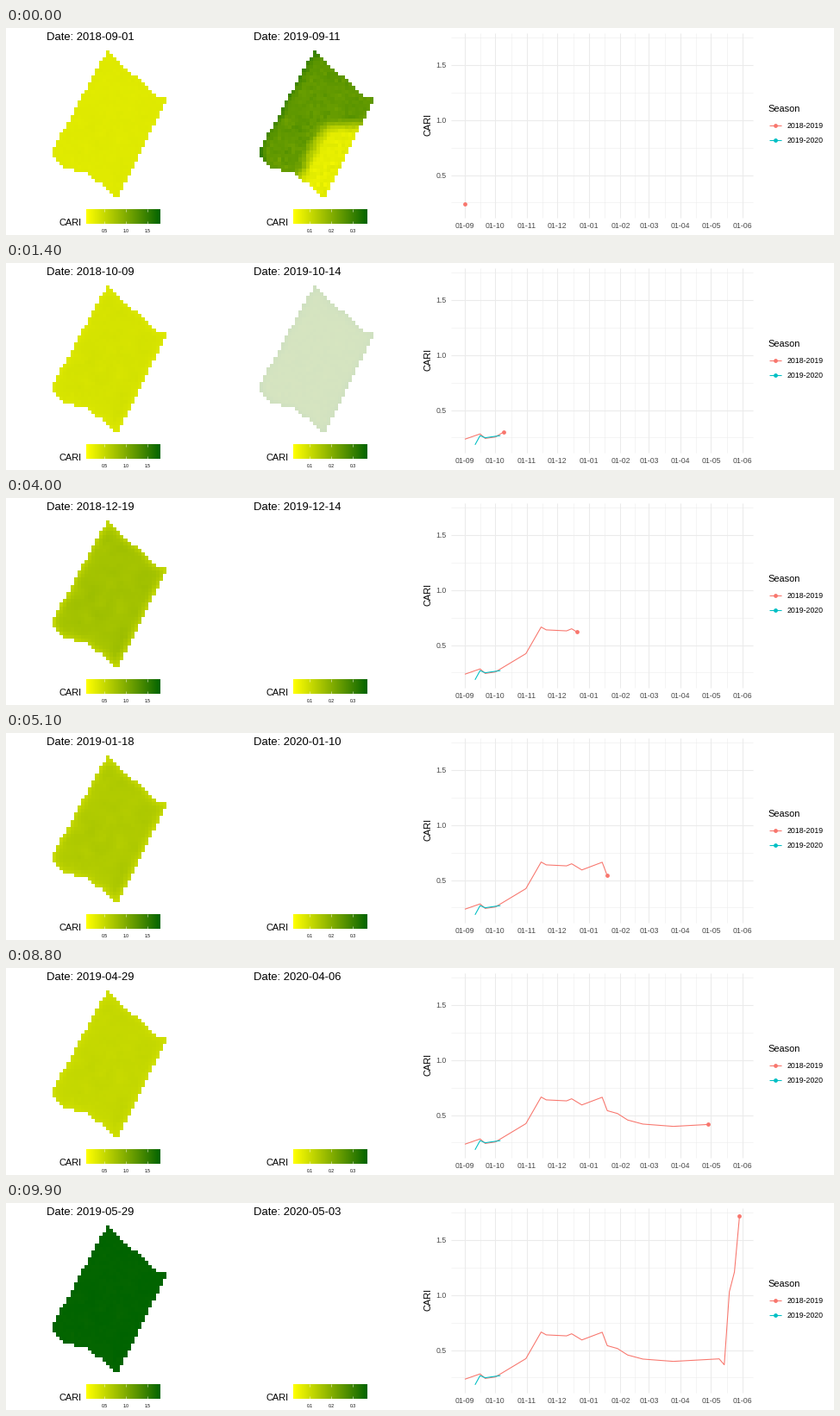
Recreate the animation shown at these times as a matplotlib script. Size 960x240 px, loop 10000 ms.

```python
import numpy as np
import matplotlib.pyplot as plt
from matplotlib.animation import FuncAnimation
from matplotlib.path import Path

W, H = 960, 240
FRAMES, STEP = 100, 100
DAYS = 270
RED, TEAL, GRID, GREY = "#F8766D", "#00BFC4", "#EBEBEB", "#4D4D4D"
PX = 0.72  # points per pixel at 100 dpi

plt.rcParams["font.family"] = "Liberation Sans"
fig = plt.figure(figsize=(W / 100, H / 100), dpi=100, facecolor="white")
ax = fig.add_axes([0, 0, 1, 1])
ax.axis("off")


def label(x, y, s, size, color="black", **kw):
    kw = {"va": "center_baseline", "ha": "left", **kw}
    return ax.text(x, y, s, fontsize=size * PX, color=color, **kw)


def line(x, y, color, width=1.07, **kw):
    kw = {"solid_capstyle": "butt", **kw}
    return ax.plot(x, y, color=color, lw=width * PX, **kw)[0]


def dot(x, y, color):
    return ax.plot(x, y, "o", color=color, ms=4.8 * PX, mew=0, zorder=5)[0]


def smooth(t):
    t = np.clip(t, 0, 1)
    return t * t * (3 - 2 * t)


def shade(t):
    """Yellow at 0 to dark green at 1."""
    t = np.clip(t, 0, 1)
    return np.stack([(1 - t) ** 0.9, 1 - 0.608 * t, 0 * t], axis=-1)


# ---- field raster ----
COLS, ROWS = 32, 41
X0, X1, Y0, Y1 = 54, 186, 26, 196
SHIFT = 240
cx, cy = np.meshgrid(X0 + (np.arange(COLS) + 0.5) * (X1 - X0) / COLS,
                     Y0 + (np.arange(ROWS) + 0.5) * (Y1 - Y0) / ROWS)
outline = Path([(117.5, 25.5), (173, 77.8), (185, 79), (185, 89), (182, 91),
                (130, 196), (126, 195), (95, 168.5), (66, 162), (55, 149.5), (55, 140)])
inside = outline.contains_points(np.c_[cx.ravel(), cy.ravel()]).reshape(cx.shape)


def blur(a):
    p = np.pad(a, 1)
    return sum(p[i:i + ROWS, j:j + COLS] for i in range(3) for j in range(3)) / 9


rng = np.random.default_rng(4)
edge = np.clip((1 - blur(blur(inside.astype(float)))) * 2, 0, 1)
coarse = blur(blur(rng.normal(size=cx.shape))) * 2.5
fine = rng.normal(size=cx.shape)

# first image of the second season: green with a bare patch at the lower right
bare = smooth((cy - 101) / 24) * smooth((cx + 0.5 * (cy - 115) - 115) / 26 + 0.1 * coarse)
north_west = edge * (cx + 0.55 * cy < 146)
green = 0.25 + 0.05 * north_west + 0.008 * coarse + 0.006 * fine
start = green * (1 - bare) + (0.06 + 0.006 * fine) * bare


def raster(t, alpha=1.0):
    return np.dstack([shade(t), inside * alpha])


def image(data, x0, x1, y0, y1):
    return ax.imshow(data, aspect="auto", interpolation="nearest", extent=(x0, x1, y1, y0))


left, right = (image(np.zeros((ROWS, COLS, 4)), X0 + dx, X1 + dx, Y0, Y1)
               for dx in (0, SHIFT))


def colourbar(dx, unit, x):
    image(shade(np.linspace(0, 1, 86))[None], 93 + dx, 179 + dx, 210, 227)
    label(61 + dx, 225, "CARI", 11)
    for i in range(3):
        for y in (210, 223.6):
            line([x + 25 * i] * 2, [y, y + 3.4], "white", 0.5)
        label(x + 25 * i, 235, f"{unit * (i + 1):.1f}", 5, ha="center")


colourbar(0, 0.5, 114.3)
colourbar(SHIFT, 0.1, 352.3)
titles = [label(47 + dx, 14, "", 13, va="baseline") for dx in (0, SHIFT)]


# ---- chart ----
def sx(day):
    return 532 + 1.1795 * np.asarray(day, float)


def sy(v):
    return 43 + (1.5 - np.asarray(v, float)) * 127.5


def grid_x(day, width=1.07):
    line([sx(day)] * 2, [5.5, 220], GRID, width)


def grid_y(v, width=1.07):
    line([516, 866], [sy(v)] * 2, GRID, width)


dates = np.arange("2018-09", "2019-07", dtype="datetime64[M]")
months = (dates.astype("datetime64[D]") - np.datetime64("2018-09-01")).astype(int)
for date, day in zip(dates, months):
    grid_x(day)
    label(sx(day), 229, f"01-{str(date)[5:]}", 8.8, GREY, ha="center")
for day in (months[1:] + months[:-1]) / 2:
    grid_x(day, 0.53)
for v in np.arange(0.5, 2, 0.5):
    grid_y(v)
    label(511, sy(v), f"{v:.1f}", 8.8, GREY, ha="right")
for v in np.arange(0.25, 2, 0.5):
    grid_y(v, 0.53)
label(489.5, 112, "CARI", 11, rotation=90, ha="center", va="center")

label(883, 97, "Season", 11, va="baseline")
for y, s, c in ((112.7, "2018-2019", RED), (129.9, "2019-2020", TEAL)):
    line([885, 899], [y, y], c)
    dot([892], [y], c)
    label(906, y, s, 8.8)


class Series:
    """A line revealed up to the current frame, led by a dot."""

    def __init__(self, points, color, stays):
        self.days, self.values = np.array(points).T
        self.keys = np.round(self.days * (FRAMES - 1) / DAYS)
        self.line = line([], [], color, zorder=4)
        self.dot = dot([], [], color)
        self.stays = stays

    def at(self, n):
        return np.interp(n, self.keys, self.days), np.interp(n, self.keys, self.values)

    def show(self, n):
        d, v = self.at(n)
        past = self.keys <= n
        begun = past.any()
        shown = begun and (self.stays or n <= self.keys[-1])
        xs, ys = np.r_[self.days[past], d], np.r_[self.values[past], v]
        self.line.set_data(sx(xs) if begun else [], sy(ys) if begun else [])
        self.dot.set_data([sx(d)] if shown else [], [sy(v)] if shown else [])


first = Series([(0, 0.235), (15, 0.283), (20, 0.242), (30, 0.255), (60, 0.422),
                (75, 0.664), (80, 0.638), (100, 0.629), (105, 0.648), (115, 0.592),
                (135, 0.662), (140, 0.54), (150, 0.514), (160, 0.455), (175, 0.418),
                (205, 0.397), (250, 0.42), (255, 0.366), (260, 1.03), (265, 1.21),
                (270, 1.72)], RED, stays=True)
second = Series([(10, 0.184), (15, 0.268), (20, 0.248), (35, 0.268)], TEAL, stays=False)


def left_map(n):
    d, mean = first.at(n)
    # field margins lag behind in winter and catch up by the end
    rim = 0.3 * np.clip((d - 30) / 45, 0, 1) * np.exp(-max(d - 75, 0) / 120) \
        * np.clip((DAYS - d) / 15, 0, 1)
    v = mean + rim * (0.25 - edge) + 0.004 * fine + (0.01 + 0.1 * rim) * coarse
    return raster(v / 1.73)


def right_map(n):
    even = 0.265 + 0.03 * edge + 0.004 * coarse + 0.003 * fine
    k = min(n / 2, 1)
    v = start * (1 - k) + even * k
    return raster((v - 0.024) / 0.344, np.clip((15 - n) / 4, 0, 1))


def update(n):
    for text, day0, span in zip(titles, ("2018-09-01", "2019-09-11"), (DAYS, 235)):
        text.set_text(f"Date: {np.datetime64(day0) + n * span // (FRAMES - 1)}")
    left.set_data(left_map(n))
    right.set_data(right_map(n))
    first.show(n)
    second.show(n)
    return [left, right, *titles]


ax.set_xlim(0, W)
ax.set_ylim(H, 0)
anim = FuncAnimation(fig, update, frames=FRAMES, interval=STEP, repeat=True,
                     repeat_delay=0, blit=False)
plt.show()
```
